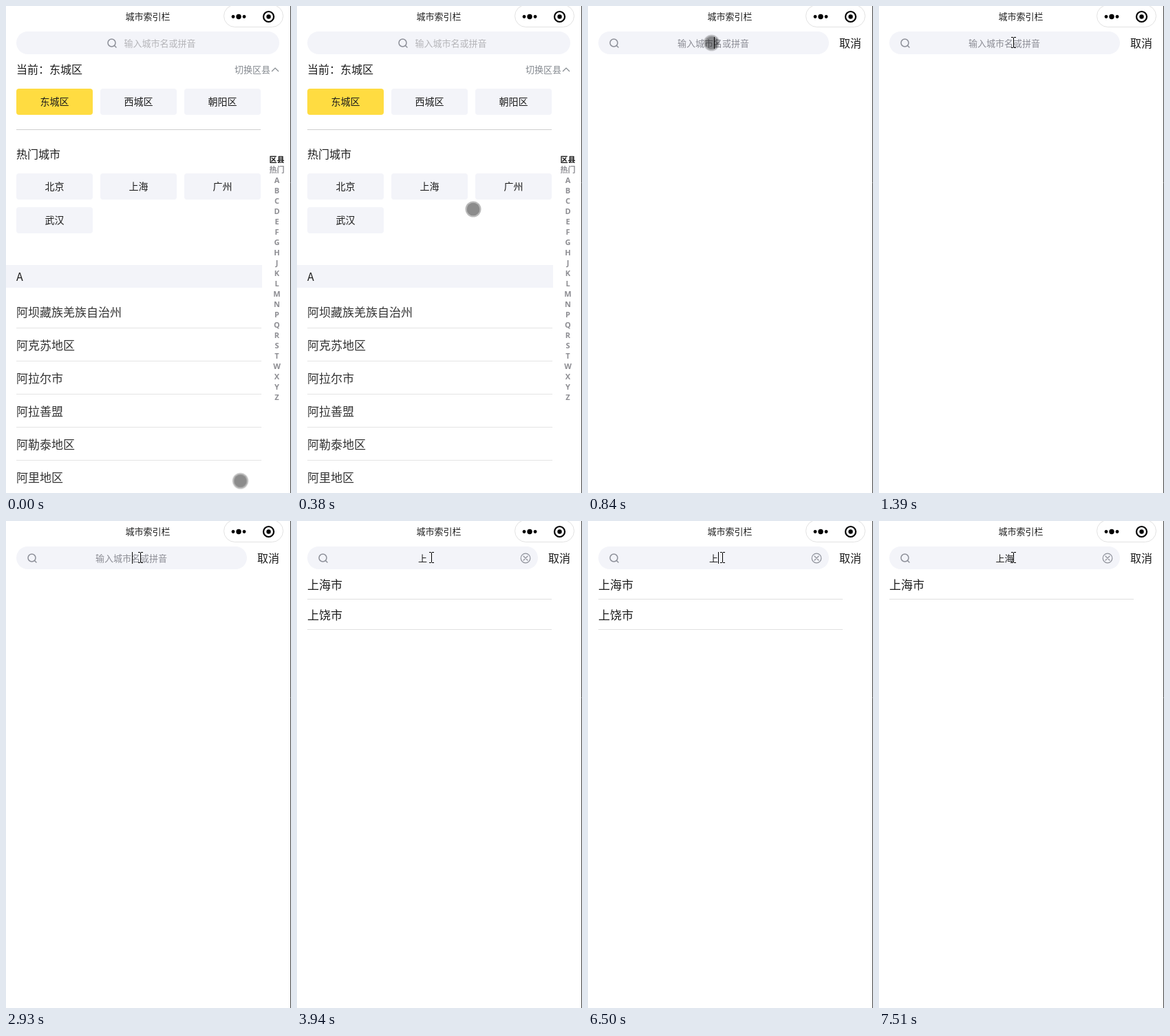
These frames come from a looping animation (414x707 px, 8000 ms). An HTML page:

```html
<!DOCTYPE html>
<html lang="zh-CN">
<head>
<meta charset="utf-8">
<title>城市索引栏</title>
<style>
html, body { margin: 0; width: 100%; height: 100%; overflow: hidden; background: #fff; }
svg { display: block; }
text { font-family: "Noto Sans CJK SC", "Noto Sans CJK", "Noto Sans", sans-serif; fill: #1c1c1c; }
.mid { text-anchor: middle; }
.s13 { font-size: 13px; }
.s14 { font-size: 14px; }
.s16 { font-size: 16px; }
.s17 { font-size: 17px; }
.row { fill: #333; }
.index text { font: bold 11px "Open Sans", "Noto Sans CJK SC", "Noto Sans CJK", sans-serif; fill: #8d8d92; }
.index .current { fill: #111; }
.soft { fill: #f3f4f9; }
.icon { fill: none; stroke: #8d9099; stroke-width: 1.5; stroke-linecap: round; }

/* Keyframe percentages are ms / 80. */
.timed { opacity: 0; animation: 8s step-end infinite; }
.home { animation-name: home; }
.search { animation-name: search; }
.hint { animation-name: hint; }
.filled { animation-name: filled; }
.one { animation-name: one; }
.two { animation-name: two; }
.match { animation-name: match; }
.other { animation-name: other; }
.caret { animation-name: caret; }
.touch { animation-name: touch; }
.beam { animation-name: beam; }

@keyframes home { 0% { opacity: 1 } 10.5%, 100% { opacity: 0 } }
@keyframes search { 0% { opacity: 0 } 10.5%, 100% { opacity: 1 } }
@keyframes hint { 0% { opacity: 1 } 42.5%, 100% { opacity: 0 } }
@keyframes filled { 0% { opacity: 0 } 42.5%, 100% { opacity: 1 } }
@keyframes one { 0% { opacity: 0 } 42.5% { opacity: 1 } 87%, 100% { opacity: 0 } }
@keyframes two { 0% { opacity: 0 } 87%, 100% { opacity: 1 } }
@keyframes match { 0% { opacity: 0 } 49.25%, 100% { opacity: 1 } }
@keyframes other { 0% { opacity: 0 } 49.25% { opacity: 1 } 93.875%, 100% { opacity: 0 } }
@keyframes caret {
  0% { opacity: 0; transform: translateX(183px) }
  10.5%, 24%, 36.625% { opacity: 1; transform: translateX(183px) }
  17.375%, 30.875% { opacity: 0; transform: translateX(183px) }
  42.5%, 55%, 68.625%, 81.25% { opacity: 1; transform: translateX(189px) }
  49.25%, 61.875%, 75.5% { opacity: 0; transform: translateX(189px) }
  87% { opacity: 1; transform: translateX(195px) }
  93.875%, 100% { opacity: 0; transform: translateX(195px) }
}
@keyframes touch {
  0% { opacity: 1; transform: translate(340.5px, 689.5px) }
  .875% { opacity: 1; transform: translate(338px, 670px) }
  1.875% { opacity: 1; transform: translate(329px, 618px) }
  2.75% { opacity: 1; transform: translate(312px, 532px) }
  3.75% { opacity: 1; transform: translate(286px, 418px) }
  4.75% { opacity: 1; transform: translate(256px, 295px) }
  5.75% { opacity: 1; transform: translate(224px, 176px) }
  6.625% { opacity: 1; transform: translate(197px, 83px) }
  7.625% { opacity: 1; transform: translate(181px, 30.5px) }
  8.625% { opacity: 1; transform: translate(178px, 43px) }
  9.5% { opacity: 1; transform: translate(178px, 53.5px) }
  10.5% { opacity: 1; transform: translate(179.5px, 53.5px) }
  11.375%, 100% { opacity: 0; transform: translate(179.5px, 53.5px) }
}
@keyframes beam {
  0% { opacity: 0; transform: translate(181px, 45px) }
  11.375% { opacity: 1; transform: translate(181px, 45px) }
  12.375% { opacity: 1; transform: translate(184px, 45px) }
  14.25% { opacity: 1; transform: translate(191px, 45px) }
  15.25%, 100% { opacity: 1; transform: translate(195px, 45px) }
}
</style>
</head>
<body>
<svg width="414" height="707" viewBox="0 0 414 707">
  <defs>
    <g id="lens" class="icon"><circle r="5.5"/><path d="M4 4l2.5 2.5"/></g>
  </defs>

  <text class="mid s13" x="206" y="20">城市索引栏</text>
  <rect x="316.5" y="-1.5" width="86" height="32" rx="16" fill="#fff" stroke="#e2e2e2"/>
  <circle cx="330" cy="15.5" r="2.4"/>
  <circle cx="338" cy="15.5" r="3.7"/>
  <circle cx="346" cy="15.5" r="2.4"/>
  <circle cx="381.5" cy="15.5" r="7.5" fill="none" stroke="#000" stroke-width="2.2"/>
  <circle cx="381.5" cy="15.5" r="3.2"/>

  <g class="timed home">
    <rect class="soft" x="15" y="37" width="382" height="33" rx="16.5"/>
    <use href="#lens" x="153.5" y="53.5"/>
    <text class="s13" x="171.5" y="59" style="fill:#b4b4b8">输入城市名或拼音</text>
    <text class="s16" x="15" y="98">当前：东城区</text>
    <text class="s13" x="332" y="97" style="fill:#84898f">切换区县</text>
    <path d="M386 95l5-5 5 5" fill="none" stroke="#84898f" stroke-width="1.2"/>
    <path d="M15 179.5h355" stroke="#cfcfcf"/>
    <text class="s16" x="15" y="221">热门城市</text>
    <g id="chips"></g>
    <rect class="soft" y="376" width="372" height="33"/>
    <text class="s16" x="15" y="399">A</text>
    <g id="cities"></g>
    <g id="index" class="index"></g>
  </g>

  <g class="timed search">
    <rect class="soft" x="15" y="37" width="335" height="33" rx="16.5"/>
    <use href="#lens" x="37.5" y="53.5"/>
    <text class="s16" x="365" y="60">取消</text>
    <text class="timed hint s13" x="130" y="59" style="fill:#8b8c94">输入城市名或拼音</text>
    <g class="timed filled icon" style="stroke-width:1.2">
      <circle cx="332" cy="54" r="6.8"/>
      <path d="M329 51l6 6m0-6l-6 6"/>
    </g>
    <text class="timed one s13" x="176" y="59">上</text>
    <text class="timed two s13" x="169.5" y="59">上海</text>
    <g class="timed match">
      <text class="s17" x="15" y="99">上海市</text>
      <path d="M15 113.5h355" stroke="#e0e0e0"/>
    </g>
    <g class="timed other">
      <text class="s17" x="15" y="143">上饶市</text>
      <path d="M15 157.5h355" stroke="#e0e0e0"/>
    </g>
  </g>

  <rect class="timed caret" y="45" width="1" height="17"/>
  <path class="timed beam" d="M-3 .5h3m1 0h3M.5 1v14M-3 15.5h3m1 0h3" fill="none" stroke="#000"/>
  <g class="timed touch">
    <circle r="10.5" fill="none" stroke="#000" stroke-opacity=".27" stroke-width="2"/>
    <circle r="9.5" fill-opacity=".45"/>
  </g>
  <path d="M413.5 0v707" stroke="#444"/>
</svg>
<script>
const fill = (id, items, draw) => {
  document.getElementById(id).innerHTML = items.map(draw).join('');
};

const chips = [
  ['东城区', 0, 120], ['西城区', 1, 120], ['朝阳区', 2, 120],
  ['北京', 0, 243], ['上海', 1, 243], ['广州', 2, 243], ['武汉', 0, 292]
];
fill('chips', chips, ([name, column, y], i) => {
  const x = 15 + column * 122;
  return `<rect x="${x}" y="${y}" width="111" height="38" rx="4" fill="${i ? '#f3f4f9' : '#ffdc41'}"/>
    <text class="mid s14" x="${x + 55.5}" y="${y + 24}">${name}</text>`;
});

const cities = ['阿坝藏族羌族自治州', '阿克苏地区', '阿拉尔市', '阿拉善盟', '阿勒泰地区', '阿里地区'];
fill('cities', cities, (name, i) =>
  `<text class="row s17" x="15" y="${451 + i * 48}">${name}</text>
   <path d="M15 ${467.5 + i * 48}h356" stroke="#e4e4e4"/>`);

fill('index', ['区县', '热门', ...'ABCDEFGHJKLMNPQRSTWXYZ'], (label, i) =>
  `<text class="mid ${i ? '' : 'current'}" x="393.5" y="${227 + i * 15}">${label}</text>`);
</script>
</body>
</html>
```
